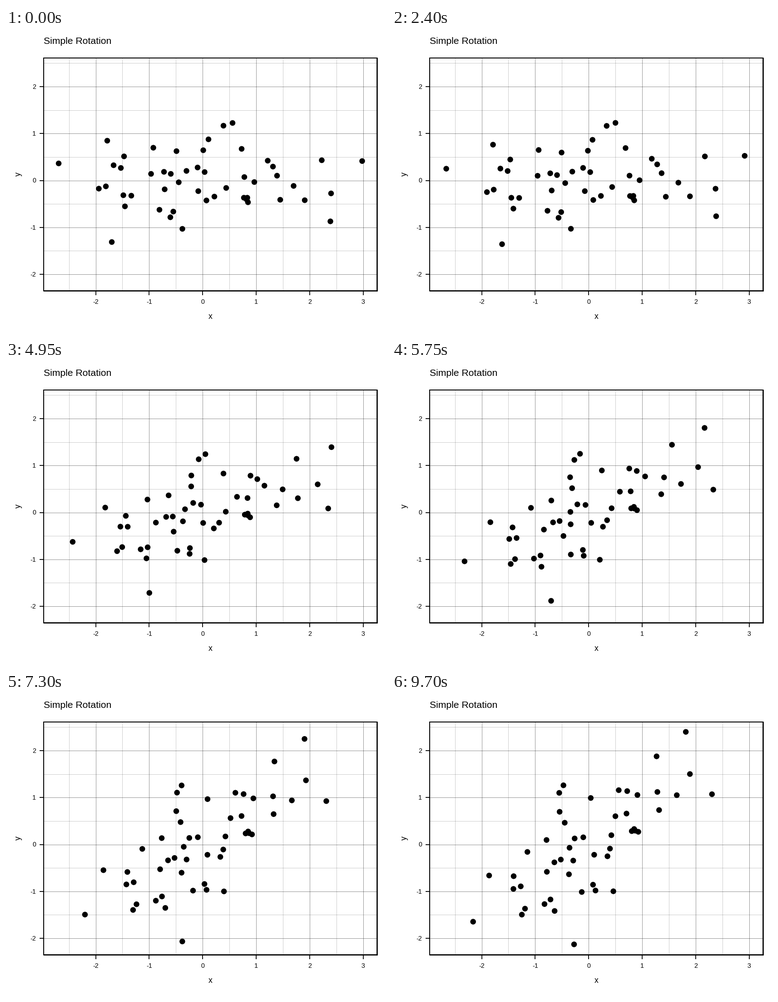
A matplotlib script for the animation above (10000 ms loop, 837 by 669 pixels).

```python
import matplotlib.pyplot as plt
import numpy as np
from matplotlib.animation import FuncAnimation

WIDTH, HEIGHT, DPI = 837, 669, 64
PT = 72 / DPI  # points per pixel
FRAMES, INTERVAL = 200, 50
ORIGIN = np.array([433.25, 335.5])
UNIT = np.array([117.87, -103.25])
LEFT, RIGHT, TOP, BOTTOM = 83, 817.5, 65.5, 578

# Starting centres of the dots, in stage pixels
START = np.array([
    (116, 298), (204.5, 353.5), (220, 348.5), (223, 248), (237, 302),
    (233, 471), (253, 308), (260, 282.5), (258.5, 368), (262, 392.5),
    (276, 369), (324.5, 263.5), (319.5, 321), (348, 316.5), (349.5, 355),
    (338, 400), (363, 321), (375.5, 271), (380.5, 339.5), (368.5, 404),
    (362, 416.5), (388.5, 442), (397.5, 314.5), (422, 307), (423.5, 359),
    (434.5, 269), (437.5, 317), (446, 245), (441.5, 379.5), (459, 371),
    (479, 215), (499, 209), (485, 352), (519, 266), (525, 328),
    (524, 373.5), (531.5, 373.5), (533, 383.5), (530.2, 377.5), (547, 339),
    (576.5, 292), (588, 305), (597, 325), (604, 378), (633.5, 347.5),
    (658, 379), (695.5, 291), (716, 364), (714.5, 425.5), (784.5, 292.8),
])


def rotate(points, degrees):
    """Rotate stage points about the data origin, in data units."""
    angle = np.radians(degrees)
    c, s = np.cos(angle), np.sin(angle)
    data = (points - ORIGIN) / UNIT
    return data @ np.array([[c, s], [-s, c]]) * UNIT + ORIGIN


def cubic_in_out(t):
    return 4 * t**3 if t < 0.5 else 1 - 4 * (1 - t)**3


def label(x, y, text, size, **kwargs):
    ax.text(x, y, text, fontsize=size * PT, family="Liberation Sans",
            color="black", **{"va": "baseline", **kwargs})


def grid(xs, ys, alpha):
    style = dict(color="black", alpha=alpha, lw=PT, zorder=1)
    ax.vlines(ORIGIN[0] + UNIT[0] * xs, TOP, BOTTOM, **style)
    ax.hlines(ORIGIN[1] + UNIT[1] * ys, LEFT, RIGHT, **style)


fig = plt.figure(figsize=(WIDTH / DPI, HEIGHT / DPI), dpi=DPI, facecolor="white")
ax = fig.add_axes([0, 0, 1, 1])
ax.set(xlim=(0, WIDTH), ylim=(HEIGHT, 0), autoscale_on=False)
ax.axis("off")

x_ticks, y_ticks = np.arange(-2, 4), np.arange(-2, 3)
grid(np.arange(-2.5, 3), np.arange(-1.5, 3), 0.2)
grid(x_ticks, y_ticks, 0.42)

# Panel border
line = dict(color="black", zorder=4)
ax.vlines(LEFT, TOP - 1, BOTTOM + 1, lw=2 * PT, **line)
ax.vlines(RIGHT, TOP - 1, BOTTOM + 1, lw=2.7 * PT, **line)
ax.hlines(TOP, LEFT - 1, RIGHT + 1, lw=2 * PT, **line)
ax.hlines(BOTTOM, LEFT - 1, RIGHT + 1, lw=2.7 * PT, **line)

for k in x_ticks:
    x = ORIGIN[0] + UNIT[0] * k
    ax.vlines(x, BOTTOM, 588, lw=1.8 * PT, **line)
    label(x, 607, str(k), 14.08, ha="center")
for k in y_ticks:
    y = ORIGIN[1] + UNIT[1] * k
    ax.hlines(y, 74, LEFT, lw=1.8 * PT, **line)
    label(66, y + 5, str(k), 14.08, ha="right")

label(83, 34.7, "Simple Rotation", 21.12, ha="left")
label(450.3, 639.7, "x", 17.6, ha="center")
label(32, 321.5, "y", 17.6, ha="center", rotation=90, rotation_mode="anchor")

END = rotate(START, 45)
# One size per dot keeps sub-pixel placement
dots = ax.scatter(*START.T, s=np.full(len(START), (12.5 * PT)**2),
                  color="black", edgecolors="none", zorder=3)


def update(frame):
    share = cubic_in_out(frame / (FRAMES - 1))
    dots.set_offsets(START + (END - START) * share)
    return dots,


anim = FuncAnimation(fig, update, frames=FRAMES, interval=INTERVAL,
                     repeat=True, repeat_delay=0)
plt.show()
```
